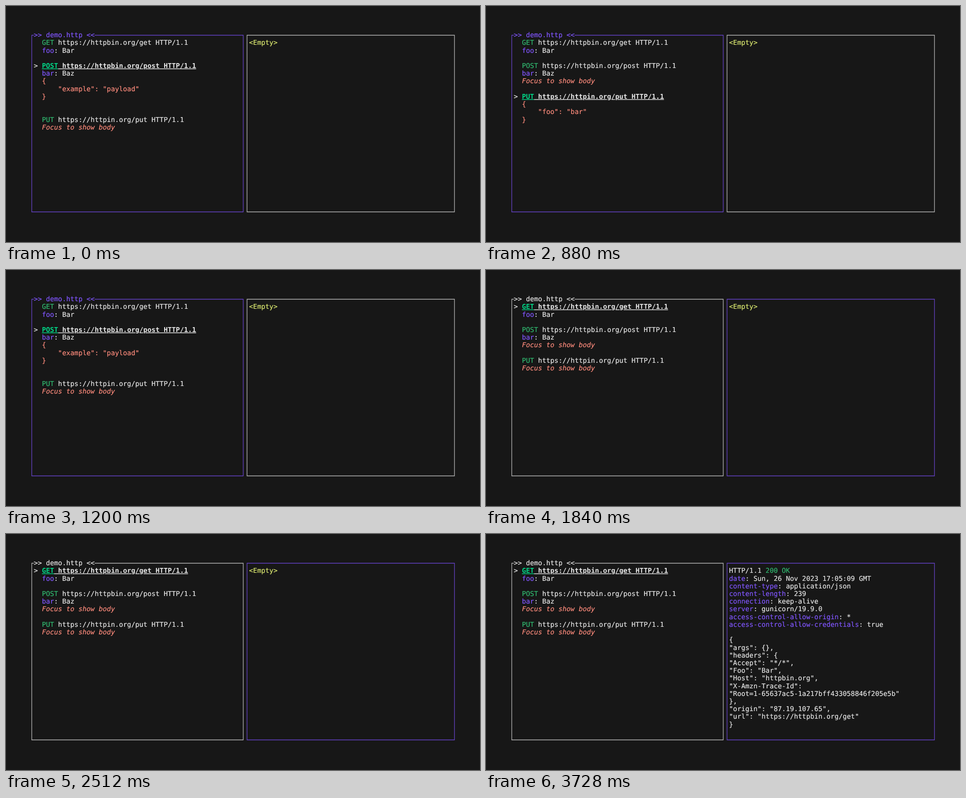
An HTML page that plays this animation: 1058 px wide and 529 px high, repeating every 4.24 s.

```html
<!DOCTYPE html>
<html lang="en">
<head>
<meta charset="utf-8">
<title>Terminal HTTP client</title>
<style>
  html, body { margin: 0; width: 100%; height: 100%; overflow: hidden; background: #171717; }
  svg { display: block; }
  text {
    font: 15.06px "DejaVu Sans Mono", monospace;
    color: #e8e8e8; white-space: pre; text-rendering: geometricPrecision;
  }
  tspan { fill: currentColor; stroke: currentColor; stroke-width: .2; }
  path { fill: none; stroke: #bfbfbf; stroke-width: 1.3; }
  path.active { stroke: #6a45d2; }
  .method { color: #31bb71; }
  .key { color: #8056ff; }
  .body { color: #ff8c7d; }
  .hint { color: #ff8c7d; font-style: italic; }
  .empty { color: #dcea70; }
  .selected {
    font-weight: bold; stroke: none;
    text-decoration: underline; text-decoration-thickness: 1px; text-underline-offset: 1px;
  }
  .method.selected { color: #00d787; }
</style>
</head>
<body>
<svg id="stage" width="1058" height="529" viewBox="0 0 1058 529"></svg>
<script>
const stage = document.getElementById("stage");
const COL = 9.067, ROW = 17.21;
const LOOP = 4240;

const requests = [
  { method: "GET", url: "https://httpbin.org/get", header: ["foo", "Bar"] },
  { method: "POST", url: "https://httpbin.org/post", header: ["bar", "Baz"],
    body: ["{", '    "example": "payload"', "}", ""] },
  { method: "PUT", url: "https://httpin.org/put", body: ["{", '    "foo": "bar"', "}"] },
];

const responseHeaders = [
  ["date", "Sun, 26 Nov 2023 17:05:09 GMT"],
  ["content-type", "application/json"],
  ["content-length", "239"],
  ["connection", "keep-alive"],
  ["server", "gunicorn/19.9.0"],
  ["access-control-allow-origin", "*"],
  ["access-control-allow-credentials", "true"],
];

const responseBody = `{
"args": {},
"headers": {
"Accept": "*/*",
"Foo": "Bar",
"Host": "httpbin.org",
"X-Amzn-Trace-Id":
"Root=1-65637ac5-1a217bff433058846f205e5b"
},
"origin": "87.19.107.65",
"url": "https://httpbin.org/get"
}`.split("\n");

const steps = [
  { at: 0, selected: 1 },
  { at: 400, selected: 2 },
  { at: 1200, selected: 1 },
  { at: 1400, selected: 0 },
  { at: 1840, selected: 0, right: true },
  { at: 2960, selected: 0, right: true, response: true },
];

const escapeText = s => s.replace(/&/g, "&amp;").replace(/</g, "&lt;");

// Each part is a [string, class] pair.
function line(col, row, ...parts) {
  const spans = parts.map(([s, cls = ""]) => `<tspan class="${cls}">${escapeText(s)}</tspan>`);
  return `<text x="${62 + col * COL}" y="${70.2 + row * ROW}">${spans.join("")}</text>`;
}

const headerLine = (col, row, [key, value]) => line(col, row, [key, "key"], [": " + value]);

const border = (d, active) => `<path class="${active ? "active" : ""}" d="${d}"/>`;

function requestList(selected) {
  let out = "", row = 1;
  requests.forEach(({ method, url, header, body }, i) => {
    const on = i === selected, mark = on ? "selected" : "";
    if (on) out += line(0, row, [">"]);
    out += line(2, row++, [method, "method " + mark], [` ${url} HTTP/1.1`, mark]);
    if (header) out += headerLine(2, row++, header);
    if (body && on) for (const s of body) out += line(2, row++, [s, "body"]);
    else if (body) out += line(2, row++, ["Focus to show body", "hint"]);
    row++;
  });
  return out;
}

function responseView() {
  return line(53, 1, ["HTTP/1.1 "], ["200 OK", "method"])
    + responseHeaders.map((h, i) => headerLine(53, i + 2, h)).join("")
    + responseBody.map((s, i) => line(53, i + 10, [s])).join("");
}

function render({ selected, right, response }) {
  stage.innerHTML =
    border("M62 65.5H57.5V461.5H529.5V65.5H198", !right)
    + border("M538 65.5H1001V461.5H538Z", right)
    + line(0, 0, [">> demo.http <<", right ? "" : "key"])
    + requestList(selected)
    + (response ? responseView() : line(53, 1, ["<Empty>", "empty"]));
}

let shown;
function tick() {
  const time = performance.now() % LOOP;
  const step = steps.findLast(s => s.at <= time);
  if (step !== shown) render(shown = step);
  requestAnimationFrame(tick);
}
tick();
</script>
</body>
</html>
```
